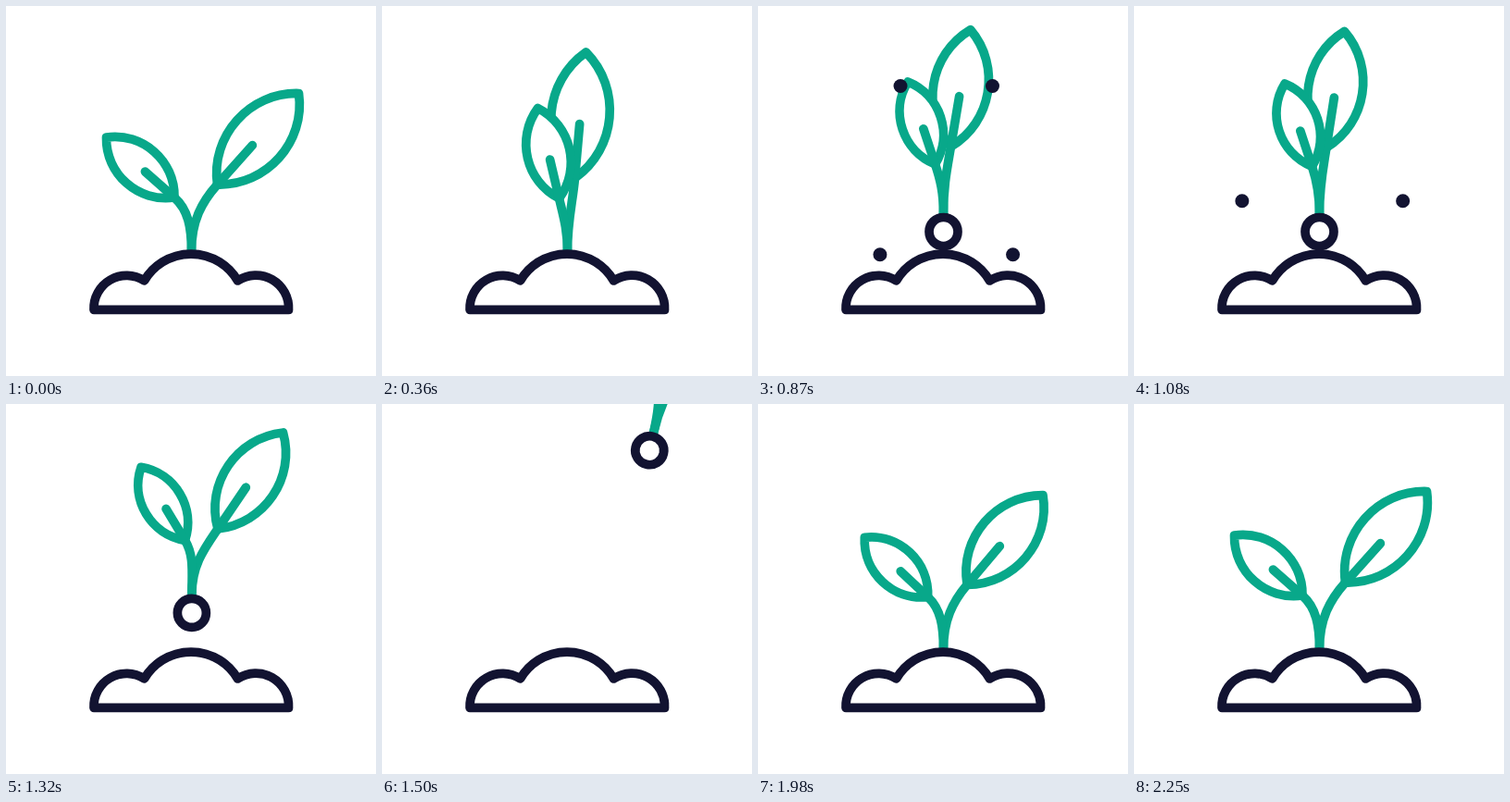
Write an HTML page that moves like this. It is 400 px wide and 400 px high and loops after 2.73 s.

```html
<!DOCTYPE html>
<html lang="en">
<head>
<meta charset="utf-8">
<title>Plant</title>
<style>
  html, body { margin: 0; width: 100%; height: 100%; overflow: hidden; background: #fff; }
  svg { display: block; width: 100%; height: 100%; }
  path, circle { stroke-width: 9.7; stroke-linecap: round; stroke-linejoin: round; }
  .leaf { stroke: #08a88a; fill: #fff; }
  .stem { stroke: #08a88a; fill: none; }
  .dark { stroke: #121331; fill: #fff; }
  .dust { fill: #121331; stroke: none; }
</style>
</head>
<body>
<svg viewBox="0 0 400 400">
  <g id="plants"></g>
  <g id="dust"></g>
  <g id="roots"></g>
  <path class="dark" d="M95 328.4A35.4 35.4 0 0 1 149.5 297A58.5 58.5 0 0 1 250.5 297A35.4 35.4 0 0 1 305.5 328.4Z"/>
</svg>
<script>
const LOOP = 2730, CX = 200.5;

const linear = p => p;
const inOut = p => p < .5 ? 4 * p ** 3 : 1 - 4 * (1 - p) ** 3;
const soft = p => (1 - Math.cos(Math.PI * p)) / 2;
const out = p => 1 - (1 - p) ** 3;

// Key: time, ease into it, base y, right leaf (foot x,y, tip x,y), left leaf (same)
const OPEN = [28, -72, 116, -170.5], OPEN_L = [-18.5, -58, -92, -123];
const CALM = [7.5, -71, 27, -196.5], CALM_L = [-8, -50.5, -37.5, -140];
const pulled = [
  [0, linear, 265, OPEN, OPEN_L],
  [360, soft, 265, [8, -79, 20, -215], [-9, -57, -32, -154.5]],
  [540, inOut, 219, [9, -75, 28, -204], [-10, -56, -37, -147]],
  [660, soft, 224, [8.5, -73, 31.5, -200], [-10, -55.5, -39.5, -144]],
  [1080, soft, 224, CALM, CALM_L],
  [1320, soft, 224, [28, -71, 98.5, -175], [-7.5, -58.5, -55, -137.5]],
  [1600, soft, 224, CALM, CALM_L]
];
const sprout = [
  [1500, linear, 282, [.2, -1, .6, -2], [-.2, -1, -.5, -2]],
  [1740, linear, 265, [13.5, -55, 63.5, -137], [-9, -46.5, -49.5, -102]],
  [2250, out, 265, OPEN, OPEN_L]
];

const mix = (a, b, p) => a + (b - a) * p;

function make(tag, cls, parent) {
  const el = document.createElementNS("http://www.w3.org/2000/svg", tag);
  el.setAttribute("class", cls);
  parent.append(el);
  return el;
}

function set(el, attrs) {
  for (const k in attrs) el.setAttribute(k, attrs[k]);
}

// Turn and length are blended so that leaves swing instead of shrinking
function swing(ax, ay, bx, by, p) {
  const ang = mix(Math.atan2(ax, -ay), Math.atan2(bx, -by), p);
  const len = mix(Math.hypot(ax, ay), Math.hypot(bx, by), p);
  return [Math.sin(ang) * len, -Math.cos(ang) * len];
}

function blend(a, b, p) {
  return {
    foot: swing(a[0], a[1], b[0], b[1], p),
    axis: swing(a[2] - a[0], a[3] - a[1], b[2] - b[0], b[3] - b[1], p)
  };
}

function pose(keys, t) {
  let i = 1;
  while (i < keys.length - 1 && t > keys[i][0]) i++;
  const a = keys[i - 1], b = keys[i];
  const p = b[1](Math.min(1, Math.max(0, (t - a[0]) / (b[0] - a[0]))));
  return { y: mix(a[2], b[2], p), right: blend(a[3], b[3], p), left: blend(a[4], b[4], p) };
}

const pt = (x, y) => x.toFixed(2) + " " + y.toFixed(2) + " ";

function leafPath({ foot: [fx, fy], axis: [ax, ay] }) {
  const at = (u, v) => pt(fx + ax * u - ay * v, fy + ay * u + ax * v);
  return "M" + at(0, 0) + "C" + at(.26, .308) + at(.74, .308) + at(1, 0) +
         "C" + at(.74, -.308) + at(.26, -.308) + at(0, 0) + "Z";
}

function stemPath({ foot: [fx, fy], axis: [ax, ay] }) {
  const len = Math.hypot(fx, fy), k = .33 * len / Math.hypot(ax, ay);
  return "M0 3L0 0C" + pt(0, -.42 * len) + pt(fx - ax * k, fy - ay * k) + pt(fx, fy) +
         "L" + pt(fx + ax * .43, fy + ay * .43);
}

function makePlant() {
  const g = make("g", "", plants);
  const parts = ["right", "left"].map(side => ({
    side, leaf: make("path", "leaf", g), stem: make("path", "stem", g)
  }));
  const root = make("circle", "dark", roots);
  set(root, { r: 15.5, cy: 20 });
  return (keys, t, shown, dx = 0, dy = 0, turn = 0) => {
    const display = shown ? "inline" : "none";
    set(g, { display });
    set(root, { display });
    if (!shown) return;
    const now = pose(keys, t);
    const transform = `translate(${CX + dx} ${now.y + dy}) rotate(${turn} 0 20)`;
    set(g, { transform });
    set(root, { transform });
    for (const { side, leaf, stem } of parts) {
      set(leaf, { d: leafPath(now[side]) });
      set(stem, { d: stemPath(now[side]) });
    }
  };
}

const plants = document.getElementById("plants");
const roots = document.getElementById("roots");
const drawOld = makePlant(), drawNew = makePlant();

// Clods: start time, sideways speed, upward speed
const clods = [[540, .217, .794], [590, .177, 1.315]].flatMap(([start, vx, vy]) =>
  [-1, 1].map(dir => {
    const el = make("circle", "dust", document.getElementById("dust"));
    set(el, { r: 7.5 });
    return { el, start, vx: vx * dir, vy };
  }));

function draw(t) {
  const p = Math.max(0, (t - 1200) / 390);
  drawOld(pulled, t, t < 1610, 420 * p ** 6, -380 * p ** 2.6, 60 * p ** 6);
  drawNew(sprout, t, t >= 1500);
  for (const { el, start, vx, vy } of clods) {
    const s = t - start, y = 261 - vy * s + .00247 * s * s;
    set(el, {
      cx: 203.75 + vx * s, cy: y,
      display: s > 0 && y < 305 ? "inline" : "none"
    });
  }
}

const begin = performance.now();
function tick() {
  draw((performance.now() - begin) % LOOP);
  requestAnimationFrame(tick);
}
tick();
</script>
</body>
</html>
```
